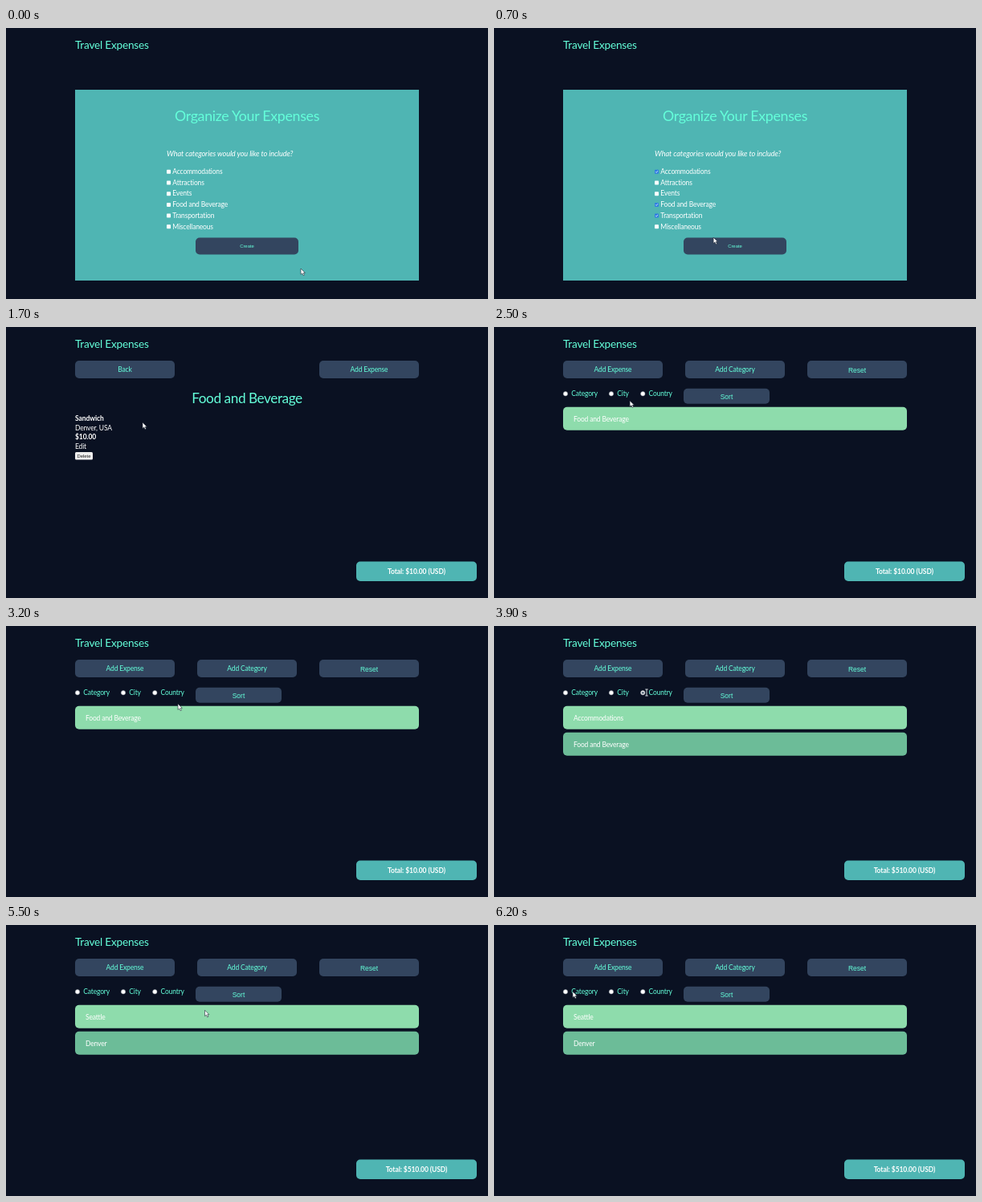
Recreate the animation shown at these times as an HTML page. Size 600 px wide and 338 px high, loop 6.3 s.

```html
<!DOCTYPE html>
<html lang="en">
<head>
<meta charset="utf-8">
<title>Travel Expenses</title>
<style>
  html, body { margin: 0; width: 100%; height: 100%; overflow: hidden; background: #0a1122; }
  svg { display: block; width: 100%; height: 100%; }
  text { font: 8.5px Lato, "Open Sans", sans-serif; letter-spacing: -.17px; fill: #fff; white-space: pre; }
  .aqua { fill: #64ffda; }
  .bold { font-weight: 700; letter-spacing: -.08px; }
  .title { font-size: 13.6px; letter-spacing: -.2px; fill: #64ffda; }
  .heading { font-size: 17.8px; letter-spacing: -.3px; fill: #64ffda; }
  .subheading { font-size: 17.2px; letter-spacing: -.43px; fill: #64ffda; }
  .question { font-size: 9.2px; font-style: italic; letter-spacing: -.1px; }
  .notice { font-size: 8.2px; font-weight: 700; letter-spacing: -.14px; }
  .added { font-size: 8.1px; letter-spacing: -.2px; fill: #c4ffc4; }
  .native { font-family: "Liberation Sans", Arial, sans-serif; letter-spacing: 0; }
  .small { font-size: 5.9px; }
  .mid { text-anchor: middle; }
</style>
</head>
<body>
<svg viewBox="0 0 600 338" preserveAspectRatio="none">
  <rect width="600" height="338" fill="#0a1122"/>
  <g id="page"></g>
  <path id="arrow" d="M0 0V7.4L1.8 5.9L3.1 8.7L4.4 8.1L3.2 5.4H5.4Z" fill="#fff" stroke="#222b38" stroke-width=".6"/>
  <path id="beam" d="M-1.7-4H1.7M0-4V4M-1.7 4H1.7" fill="none" stroke="#e8eef2" stroke-width=".9"/>
</svg>
<script>
const LOOP = 6300, STEP = 100;
const TEAL = '#4fb5b3', SLATE = '#33455f';
const CATEGORIES = ['Accommodations', 'Attractions', 'Events',
  'Food and Beverage', 'Transportation', 'Miscellaneous'];

const text = (x, y, words, cls = '') => `<text x="${x}" y="${y}" class="${cls}">${words}</text>`;
const rect = (x, y, w, h, fill, r = 0) =>
  `<rect x="${x}" y="${y}" width="${w}" height="${h}" rx="${r}" fill="${fill}"/>`;
const button = (x, label, cls = '') =>
  rect(x, 42, 124, 22, SLATE, 5) + text(x + 62, cls ? 56.5 : 55.5, label, 'aqua mid ' + cls);
const header = () => text(86, 26, 'Travel Expenses', 'title');
const total = amount =>
  rect(436, 292.5, 150, 24.5, TEAL, 5) + text(511, 308, `Total: $${amount} (USD)`, 'bold mid');

function checkbox(y, on) {
  return rect(200, y - 2.2, 5, 5, on ? '#2f7de1' : '#fff', .8) +
    (on ? `<path d="M201.2 ${y + .3}l1 1.1l1.7-2.3" fill="none" stroke="#fff" stroke-width=".7"/>` : '');
}

function setup(checked) {
  const rows = CATEGORIES.map((name, i) => {
    const y = 179 + 13.7 * i;
    return checkbox(y, checked.includes(i)) + text(207.3, y + 3, name);
  });
  return header() + rect(86, 77, 428, 238, TEAL) +
    text(300, 116, 'Organize Your Expenses', 'heading mid') +
    text(200, 160, 'What categories would you like to include?', 'question') +
    rows.join('') + rect(236, 261.5, 128, 21, SLATE, 5) +
    text(300, 274, 'Create', 'aqua mid native small');
}

function radio(x, y, label, on) {
  return `<circle cx="${x}" cy="${y + .3}" r="2.7" fill="#fff" stroke="#8b929c" stroke-width=".5"/>` +
    (on ? `<circle cx="${x}" cy="${y + .3}" r="1.5" fill="#5d6c7c"/>` : '') +
    text(x + 7.3, y + 3, label, 'aqua');
}

function overview(amount, rows, { top = 83, picked = '', notices = '' } = {}) {
  const options = [[89, 'Category'], [146, 'City'], [185.3, 'Country']];
  const list = rows.map((name, i) =>
    rect(86, 99.7 + 33 * i, 428, 29, i ? '#6cbc98' : '#8edcac', 5) +
    text(99, 117.5 + 33 * i, name));
  return header() + button(86, 'Add Expense') + button(238, 'Add Category') +
    button(390, 'Reset', 'native') + notices +
    options.map(([x, label]) => radio(x, top, label, label === picked)).join('') +
    rect(236, top - 6.3, 107, 19, SLATE, 5) +
    text(289.5, top + 6.5, 'Sort', 'aqua mid native') + list.join('') + total(amount);
}

function empty() {
  const notices = rect(86, 77, 428, 19, '#f00', 4) +
    text(95, 89.4, 'There are no expenses to display.', 'notice') +
    rect(86, 108.5, 428, 19, '#5aff5a', 4) +
    text(95, 121, 'The following categories have been added: ' +
      'Accommodations, Food and Beverage, Transportation', 'notice added');
  return overview('0.00', [], { top: 146.3, notices });
}

function details() {
  return header() + button(86, 'Back') + button(390, 'Add Expense') +
    text(300, 94.5, 'Food and Beverage', 'subheading mid') +
    text(86, 117, 'Sandwich', 'bold') + text(86, 128.5, 'Denver, USA') +
    text(86, 140, '$10.00', 'bold') + text(86, 151.5, 'Edit') +
    rect(86, 156, 22, 9.5, '#efefef', 1.5) +
    `<g style="--ink:#222">${text(97, 162.9, 'Delete', 'mid native small').replace('<text', '<text style="fill:var(--ink)"')}</g>` +
    total('10.00');
}

// Each scene holds from its start time until the next one.
const FOOD = 'Food and Beverage', BOTH = ['Accommodations', FOOD];
const scenes = [
  [0, setup([])],
  [200, setup([0])],
  [400, setup([0, 3])],
  [500, setup([0, 3, 4])],
  [900, empty()],
  [1500, details()],
  [2300, overview('10.00', [FOOD])],
  [3900, overview('510.00', BOTH, { picked: 'Country' })],
  [4400, overview('510.00', ['USA'])],
  [4900, overview('510.00', ['USA'], { picked: 'City' })],
  [5200, overview('510.00', ['Seattle', 'Denver'])]
];

// Pointer stops: time, x, y
const stops = [
  [0, 367, 300], [200, 202, 178], [400, 202, 219], [500, 202, 233],
  [800, 298, 271], [1000, 263, 265], [1400, 150, 54], [1700, 170, 119],
  [2200, 149, 53], [2700, 180, 113], [3200, 214, 97], [3700, 150, 54],
  [3800, 150, 54], [3900, 190, 83], [4000, 187, 82], [4300, 288, 86],
  [4700, 164, 82], [4900, 147, 82], [5200, 288, 86], [5600, 240, 110],
  [6200, 98, 83]
];

function pointerAt(t) {
  const i = stops.findIndex(s => s[0] > t);
  if (i < 0) return stops[stops.length - 1].slice(1);
  const [t0, x0, y0] = stops[i - 1], [t1, x1, y1] = stops[i];
  const u = (t - t0) / (t1 - t0), k = u * u * (3 - 2 * u);
  return [x0 + (x1 - x0) * k, y0 + (y1 - y0) * k];
}

const page = document.getElementById('page');
const arrow = document.getElementById('arrow');
const beam = document.getElementById('beam');
let shown = null;

function render(now) {
  const t = Math.floor((now % LOOP) / STEP) * STEP;
  const scene = scenes.filter(s => s[0] <= t).pop();
  if (scene !== shown) {
    page.innerHTML = scene[1];
    shown = scene;
  }
  const overText = t === 3900;
  const place = `translate(${pointerAt(t)})`;
  arrow.setAttribute('transform', place);
  beam.setAttribute('transform', place);
  arrow.style.display = overText ? 'none' : '';
  beam.style.display = overText ? '' : 'none';
}

const start = performance.now();
function tick() {
  render(performance.now() - start);
  requestAnimationFrame(tick);
}
tick();
</script>
</body>
</html>
```
